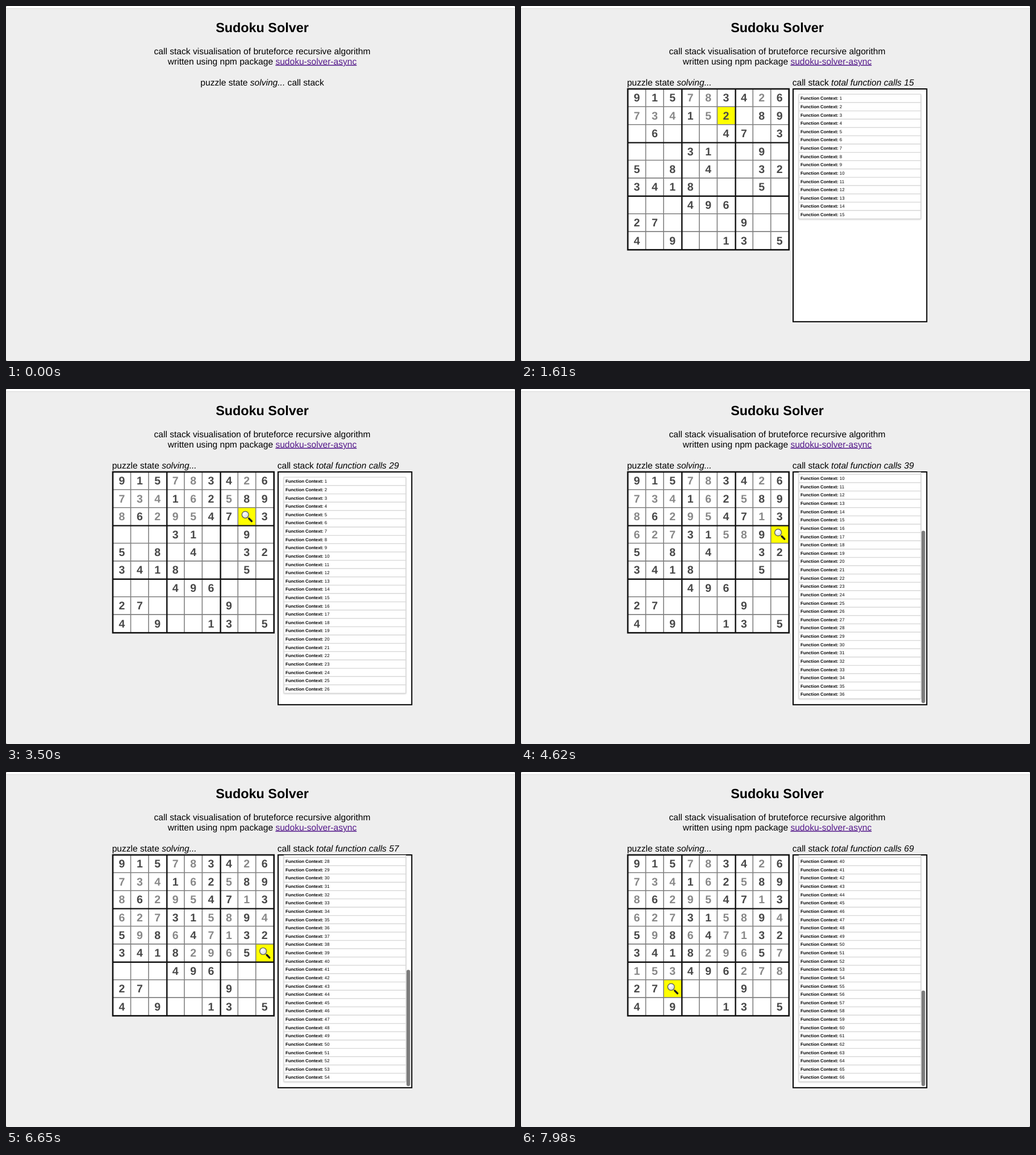
An HTML page for the animation above (8 s loop, 896 by 625 pixels).

```html
<!DOCTYPE html>
<html lang="en">
<head>
<meta charset="utf-8">
<title>Sudoku Solver</title>
<style>
  html, body { margin: 0; width: 100%; height: 100%; overflow: hidden; background: #666; }
  svg { display: block; width: 896px; height: 625px; font-family: "Liberation Sans", Arial, Helvetica, sans-serif; text-rendering: geometricPrecision; }
  .copy { font-size: 15.58px; }
  .mid { text-anchor: middle; }
  .title { font-size: 23.36px; font-weight: bold; }
  .link { fill: #551a8b; text-decoration: underline; }
  .em { font-style: italic; }
  .digit { font-size: 19.5px; font-weight: bold; text-anchor: middle; fill: #888; }
  .given { fill: #484848; }
  .thin { stroke: #808080; stroke-width: 1.6; }
  .thick { stroke: #111; stroke-width: 2.4; }
  .frame { fill: none; stroke: #111; stroke-width: 2.6; }
  .row rect { fill: #fff; stroke: #d9d9d9; stroke-width: 1.3; }
  .row text { font-size: 7.8px; }
  .row tspan { font-weight: bold; }
  #sheet { fill: #fff; filter: drop-shadow(0 1px 1.5px rgba(0, 0, 0, .25)); }
</style>
</head>
<body>
<svg viewBox="0 0 896 625">
  <defs>
    <radialGradient id="glass" cx=".4" cy=".35" r=".7">
      <stop offset="0" stop-color="#fff"/>
      <stop offset="1" stop-color="#cfd6d8"/>
    </radialGradient>
    <clipPath id="port"><rect x="480" y="146.5" width="234" height="408.5"/></clipPath>
  </defs>
  <rect width="896" height="625" rx="2.5" fill="#eee"/>
  <path d="M0 4V2.5Q0 0 2.5 0H893.5Q896 0 896 2.5V4Z" fill="#fff"/>
  <rect y="4" width="896" height="1" fill="#dadada"/>

  <text class="title mid" x="451" y="45.8">Sudoku Solver</text>
  <g class="copy">
    <text class="mid" x="451" y="84.6">call stack visualisation of bruteforce recursive algorithm</text>
    <text class="mid" x="451" y="102.6">written using npm package <tspan class="link">sudoku-solver-async</tspan></text>
    <text id="idle" class="mid" x="451" y="140">puzzle state <tspan class="em">solving...</tspan> call stack</text>
  </g>

  <g id="work" display="none">
    <g class="copy">
      <text x="186.7" y="140">puzzle state <tspan class="em">solving...</tspan></text>
      <text x="477.7" y="140">call stack <tspan class="em">total function calls <tspan id="calls"></tspan></tspan></text>
    </g>
    <rect x="188" y="146" width="283.5" height="283" fill="#fff"/>
    <rect id="mark" width="31.4" height="31.4" fill="#ff0"/>
    <g id="lines"></g>
    <rect class="frame" x="188" y="146" width="283.7" height="283.2"/>
    <g id="digits"></g>
    <g id="lens">
      <path d="M2.2 2.2L4.4 4.4" stroke="#777" stroke-width="1.8"/>
      <path d="M4 4L8.6 8.6" stroke="#1c1c1c" stroke-width="3.4" stroke-linecap="round"/>
      <circle cx="-2.6" cy="-2.8" r="6" fill="url(#glass)" stroke="#555" stroke-width="1.2"/>
    </g>

    <rect x="479" y="146" width="235.3" height="409.8" fill="#fff" stroke="#000" stroke-width="2"/>
    <g clip-path="url(#port)">
      <g id="stack"><rect id="sheet" x="489" y="155.4" width="215"/></g>
      <rect id="thumb" x="705" width="6.4" rx="3.2" fill="#7c7c7c"/>
    </g>
  </g>
</svg>
<script>
const LOOP = 8000, TICK = 70, STEP = 112.05;
const CELL = 31.4, ROW = 14.62, TOP = 155.4, END = 545.1;
const PUZZLE = '915..34.6' + '...1.2.89' + '.6...47.3' + '...31..9.' + '5.8.4..32' +
               '3418...5.' + '...496...' + '27....9..' + '4.9..13.5';

const $ = id => document.getElementById(id);
const add = (parent, tag, attrs) => {
  const el = document.createElementNS('http://www.w3.org/2000/svg', tag);
  for (const key in attrs) el.setAttribute(key, attrs[key]);
  return parent.appendChild(el);
};
const cellX = i => 204 + CELL * (i % 9);
const cellY = i => 161.3 + CELL * Math.floor(i / 9);

// Brute force search that records the board at every call and return.
function solve() {
  const board = [...PUZZLE], steps = [];
  let calls = 0;
  const record = at => steps.push({ at, calls, board: board.join('') });
  const peers = (a, b) => {
    const ra = Math.floor(a / 9), rb = Math.floor(b / 9), ca = a % 9, cb = b % 9;
    return ra === rb || ca === cb ||
      (Math.floor(ra / 3) === Math.floor(rb / 3) && Math.floor(ca / 3) === Math.floor(cb / 3));
  };
  const fits = (i, d) => board.every((v, j) => v !== d || !peers(i, j));

  function visit(i) {
    if (i === 81) return true;
    calls++;
    record(i);
    const given = PUZZLE[i] !== '.';
    for (const d of given ? PUZZLE[i] : '123456789') {
      if (!given && !fits(i, d)) continue;
      board[i] = d;
      if (visit(i + 1)) return true;
      if (!given) board[i] = '.';
      record(i);
    }
    return false;
  }
  visit(0);
  return steps;
}

const steps = solve();

for (const pass of ['thin', 'thick']) {
  for (let k = 1; k < 9; k++) {
    if ((k % 3 === 0) !== (pass === 'thick')) continue;
    const shift = pass === 'thick' ? 0.8 : 0;
    const x = 188.1 + 31.45 * k + shift, y = 145.9 + 31.4 * k + shift * 0.6;
    add($('lines'), 'path', { class: pass, d: `M${x} 146V429M188 ${y}H471.5` });
  }
}

const digits = [...PUZZLE].map((v, i) => add($('digits'), 'text', {
  class: v === '.' ? 'digit' : 'digit given', x: cellX(i), y: cellY(i) + 7
}));

const rows = Array.from({ length: 81 }, (_, i) => {
  const y = TOP + ROW * i, g = add($('stack'), 'g', { class: 'row' });
  add(g, 'rect', { x: 489.2, y, width: 214.6, height: ROW });
  const text = add(g, 'text', { x: 492, y: y + 9.9 });
  add(text, 'tspan').textContent = 'Function Context:';
  text.append(' ' + (i + 1));
  return g;
});

function show(step) {
  $('idle').style.display = step ? 'none' : '';
  $('work').style.display = step ? 'inline' : 'none';
  if (!step) return;

  const { at, calls, board } = step, depth = at + 1;
  $('calls').textContent = calls;
  digits.forEach((el, i) => el.textContent = board[i] === '.' ? '' : board[i]);
  $('mark').setAttribute('x', cellX(at) - CELL / 2);
  $('mark').setAttribute('y', cellY(at) - CELL / 2);
  $('lens').setAttribute('transform', `translate(${cellX(at)} ${cellY(at)})`);
  $('lens').style.display = board[at] === '.' ? '' : 'none';

  rows.forEach((el, i) => el.style.display = i < depth ? '' : 'none');
  $('sheet').setAttribute('height', ROW * depth);
  const scroll = Math.max(0, TOP + ROW * depth - END);
  $('stack').setAttribute('transform', `translate(0 ${-scroll})`);
  const bar = 405 * 409 / (409 + scroll);
  $('thumb').style.display = scroll ? '' : 'none';
  $('thumb').setAttribute('y', 553 - bar);
  $('thumb').setAttribute('height', bar);
}

const start = performance.now();
let last;
function draw() {
  const t = (performance.now() - start) % LOOP;
  const tick = Math.floor(t / TICK) * TICK;
  const index = tick ? Math.floor((tick + 1) / STEP) : -1;
  if (index !== last) show(steps[last = index]);
  requestAnimationFrame(draw);
}
draw();
</script>
</body>
</html>
```
